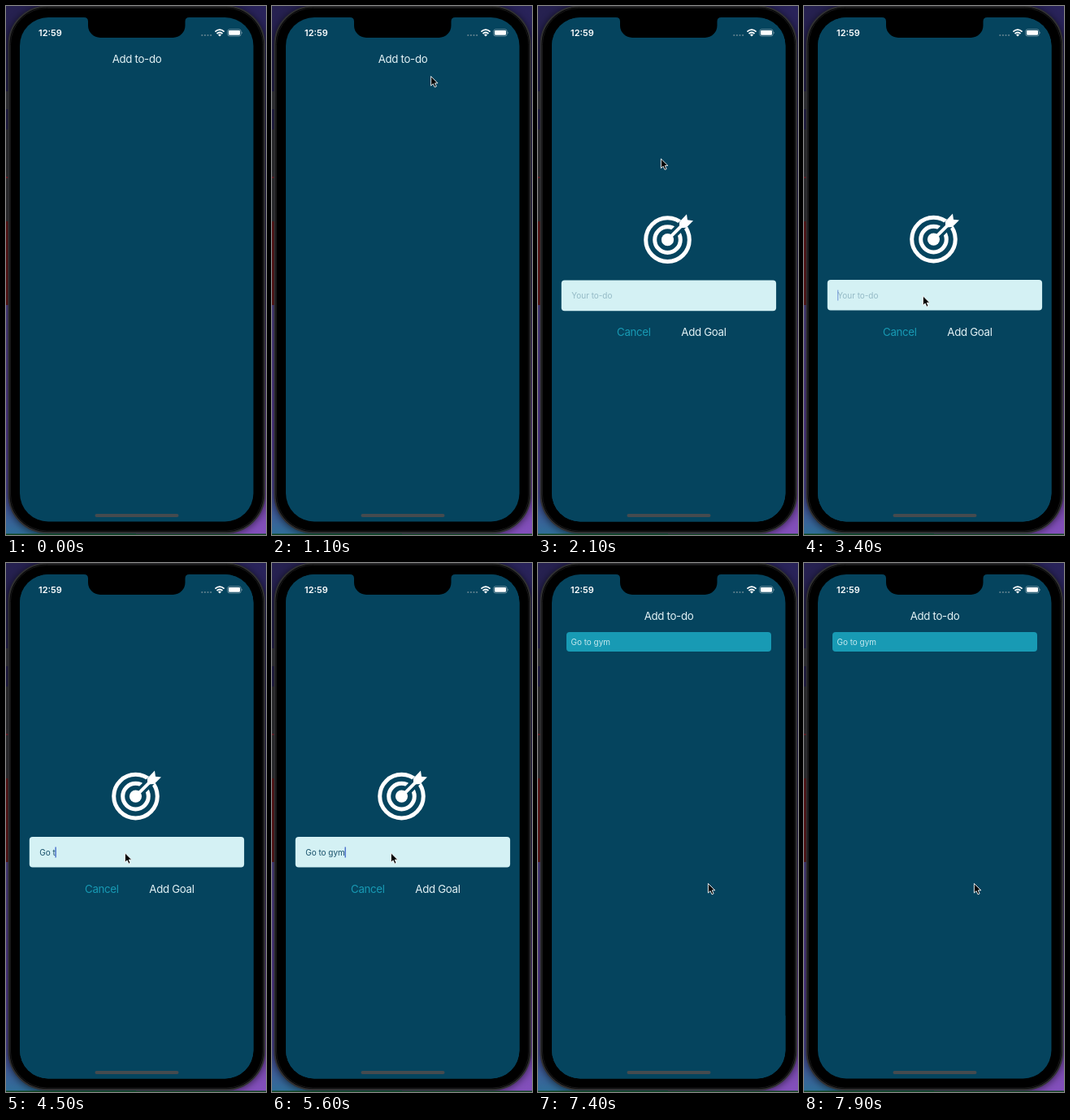
An HTML page that plays this animation: 320x651 px, repeating every 8 s.

```html
<!DOCTYPE html>
<html lang="en">
<head>
<meta charset="utf-8">
<title>To-do app</title>
<style>
  html, body { margin: 0; width: 100%; height: 100%; overflow: hidden; background: #000; }
  svg { display: block; width: 320px; height: 651px; }
  text { font-family: Inter, Roboto, sans-serif; white-space: pre; }
  .label { font-size: 13.3px; letter-spacing: -.33px; fill: #e4f3f6; }
  .small { font-size: 10px; letter-spacing: -.03px; }
</style>
</head>
<body>
<svg viewBox="0 0 320 651">
  <defs>
    <clipPath id="screenClip"><rect x="17" y="14" width="287.5" height="620.5" rx="35"/></clipPath>
    <linearGradient id="leftLow" x1="0" y1="0" x2="0" y2="1">
      <stop offset="0" stop-color="#584894"/>
      <stop offset=".55" stop-color="#5a3f9e"/>
      <stop offset=".8" stop-color="#50489c"/>
      <stop offset="1" stop-color="#2f6f98"/>
    </linearGradient>
    <linearGradient id="rightEdge" x1="0" y1="0" x2="0" y2="1">
      <stop offset="0" stop-color="#29235a"/>
      <stop offset=".5" stop-color="#2b2050"/>
      <stop offset="1" stop-color="#8450bd"/>
    </linearGradient>
    <filter id="soft" x="-10%" y="-10%" width="120%" height="120%"><feGaussianBlur stdDeviation="5"/></filter>
  </defs>

  <!-- desktop behind the phone -->
  <rect width="160" height="370" fill="#262150"/>
  <rect x="160" width="160" height="651" fill="url(#rightEdge)"/>
  <rect y="105" width="8" height="22" fill="#3b3a42"/>
  <rect y="152" width="8" height="52" fill="#333338"/>
  <rect y="204" width="8" height="61" fill="#36363a"/>
  <rect y="210" width="8" height="2" fill="#7c2530"/>
  <rect y="265" width="8" height="103" fill="#6b181a"/>
  <rect y="368" width="160" height="283" fill="url(#leftLow)"/>
  <rect x="2" y="1" width="317" height="649" rx="48" fill="#000" opacity=".6" filter="url(#soft)"/>
  <rect y="649.5" width="320" height="1.5" fill="#12451f"/>

  <!-- phone -->
  <rect x="3.5" y=".5" width="314.5" height="647.5" rx="47" fill="#000" stroke="#303032" stroke-width="2"/>
  <rect x="5.5" y="2.5" width="310.5" height="643.5" rx="45" fill="none" stroke="#19191a"/>

  <g clip-path="url(#screenClip)">
    <rect x="17" y="14" width="288" height="621" fill="#05445e"/>
    <text id="title" class="label" x="130.7" y="70">Add to-do</text>
    <g id="item">
      <rect x="35" y="85" width="252" height="24" rx="4" fill="#189ab4"/>
      <text class="small" x="40.5" y="101" fill="#c4e8ee">Go to gym</text>
    </g>

    <g id="modal">
      <rect x="17" y="14" width="288" height="621" fill="#05445e"/>
      <g transform="translate(0 -.4)" fill="none" stroke="#fff" stroke-width="5">
        <circle cx="159.5" cy="287.5" r="26.8"/>
        <circle cx="159.5" cy="287.5" r="15.8"/>
        <path d="M159.5 287.5L187 260" stroke="#05445e" stroke-width="11"/>
        <circle cx="159.5" cy="287.5" r="7.6" fill="#fff" stroke="none"/>
        <path d="M159.5 287.5L180 267" stroke-width="4"/>
        <path d="M174 273V265.5L183 256L184 263.2L191 264L182.5 272.5Z" fill="#fff" stroke="none"/>
      </g>
      <rect x="28.8" y="336.9" width="264.3" height="37.7" rx="4" fill="#d4f1f4"/>
      <text id="entry" class="small" x="41.3" y="359.8"></text>
      <rect id="caret" y="349.5" width="1.2" height="13" fill="#3158c4"/>
      <text class="label" x="97" y="405.7" style="fill:#189ab4">Cancel</text>
      <text id="add" class="label" x="176.3" y="405.7">Add Goal</text>
    </g>

    <path d="M96 10V14Q101 14 101 19V24A15 15 0 0 0 116 39H205.5A15 15 0 0 0 220.5 24V19Q220.5 14 225.5 14V10Z"/>
    <text x="40" y="37" font-size="11" font-weight="600" fill="#fff">12:59</text>
    <g fill="#60818f">
      <circle cx="241.3" cy="36" r="1.1"/><circle cx="244.9" cy="36" r="1.1"/>
      <circle cx="248.5" cy="36" r="1.1"/><circle cx="252.1" cy="36" r="1.1"/>
    </g>
    <g fill="none" stroke="#fff" stroke-width="1.8">
      <path d="M257.4 31.6Q263 26.6 268.6 31.6M259.5 34Q263 31 266.5 34"/>
      <path d="M261 35.4Q263 33.8 265 35.4L263 37.6Z" fill="#fff" stroke="none"/>
    </g>
    <rect x="272.8" y="28.8" width="16.4" height="8.2" rx="2.4" fill="none" stroke="#87a3b0" stroke-width=".8"/>
    <rect x="274" y="30" width="14" height="5.8" rx="1.3" fill="#fff"/>
    <path d="M290.2 31.5Q291.8 32.9 290.2 34.3Z" fill="#87a3b0"/>
    <rect x="109.5" y="625" width="103" height="4" rx="2" fill="#454b4f"/>
  </g>

  <path id="cursor" d="M0 0V11.6L2.7 9.2L4.6 13.4L6.7 12.5L4.9 8.4H8.4Z" fill="#000" stroke="#fff" stroke-width=".9" stroke-linejoin="round"/>
</svg>

<script>
const $ = id => document.getElementById(id);
const LOOP = 8000, STEP = 100, TRAVEL = 621;
const OPEN = 1582, CLOSE = 7200, FOCUS = 2900;
const GOAL = 'Go to gym', TYPE_START = 3900, KEY_GAP = 170;

// time, x, y of the pointer tip
const path = [
  [600, 322, 150], [1300, 164.4, 70.8], [1750, 164.4, 70.8], [2100, 151.4, 188],
  [2700, 146.4, 356.8], [6200, 146.4, 356.8], [6600, 200.4, 369.8], [6900, 209.4, 394.4], [LOOP, 209.4, 394.4]
];

const between = (t, a, b) => t >= a && t < b;

// critically damped spring: 1 at the start, settling to 0
const spring = ms => {
  const k = Math.max(0, ms) * .018;
  return (1 + k) * Math.exp(-k);
};

function pointer(t) {
  if (t < path[0][0]) return [-30, -30];
  const i = path.findIndex(p => p[0] > t);
  const [t0, x0, y0] = path[i - 1], [t1, x1, y1] = path[i];
  const u = (t - t0) / (t1 - t0), e = u * u * (3 - 2 * u);
  return [x0 + (x1 - x0) * e, y0 + (y1 - y0) * e];
}

function caretOpacity(t, typed) {
  if (!between(t, FOCUS, CLOSE)) return 0;
  const lastKey = typed ? TYPE_START + (typed - 1) * KEY_GAP : FOCUS;
  const phase = (t - lastKey) % 1000;
  return phase < 450 ? 1 : phase < 550 ? .5 : phase < 900 ? 0 : .5;
}

function draw(t) {
  const shift = TRAVEL * (t < CLOSE ? spring(t - OPEN) : 1 - spring(t - CLOSE));
  $('modal').setAttribute('transform', `translate(0 ${shift.toFixed(2)})`);
  $('title').setAttribute('opacity', between(t, 1500, 2100) ? .5 : 1);
  $('item').setAttribute('visibility', t >= CLOSE ? 'visible' : 'hidden');
  $('add').setAttribute('opacity', between(t, 7100, 7400) ? .45 : 1);

  const keys = Math.floor((t - TYPE_START) / KEY_GAP) + 1;
  const typed = t < CLOSE ? Math.max(0, Math.min(GOAL.length, keys)) : 0;
  const entry = $('entry');
  entry.textContent = typed ? GOAL.slice(0, typed) : 'Your to-do';
  entry.setAttribute('fill', typed ? '#164f69' : '#94bac6');
  $('caret').setAttribute('x', 41.1 + (typed ? entry.getComputedTextLength() : 0));
  $('caret').setAttribute('opacity', caretOpacity(t, typed));

  $('cursor').setAttribute('transform', `translate(${pointer(t).join(' ')})`);
}

const start = performance.now();
function tick() {
  const t = (performance.now() - start) % LOOP;
  draw(Math.floor(t / STEP) * STEP);
  requestAnimationFrame(tick);
}
tick();
</script>
</body>
</html>
```
